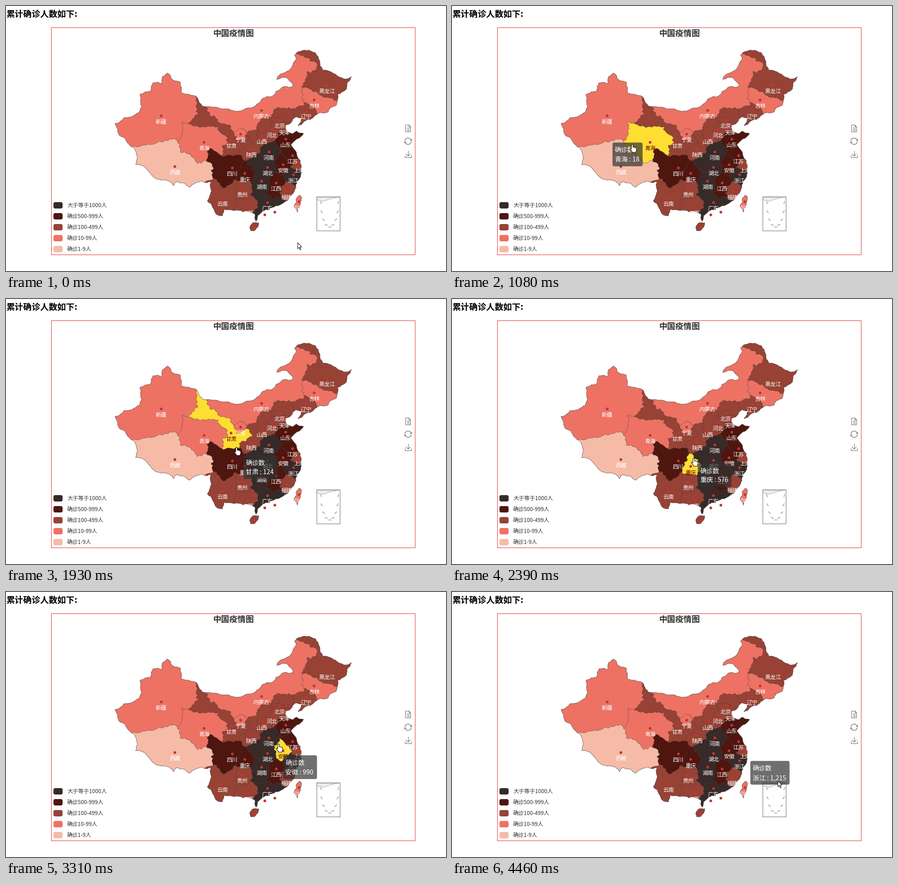
Write a matplotlib script that moves like this. It is 964 by 581 pixels and loops after 4.54 s.

```python
import random

import matplotlib.pyplot as plt
import numpy as np
from matplotlib.animation import FuncAnimation
from matplotlib.colors import to_rgb
from matplotlib.patches import Arc, Circle, FancyBboxPatch, PathPatch, Polygon, Rectangle
from matplotlib.path import Path

W, H, DPI = 964, 581, 64
LOOP, FRAMES = 4540, 59
PT = 72 / DPI
FONT = "Noto Sans CJK JP"
LEVELS = ["#f5bba7", "#ee7263", "#974236", "#4e160f", "#372a28"]
YELLOW, EDGE, RED, GRAY = "#ffdf33", "#444444", "#c23531", "#666666"

fig = plt.figure(figsize=(W / DPI, H / DPI), dpi=DPI, facecolor="white")
ax = fig.add_axes([0, 0, 1, 1])
ax.axis("off")


def text(x, y, s, px, color, ha="left", z=5, **kw):
    """Place text with its middle at height y."""
    return ax.text(x, y + 0.35 * px, s, size=px * PT, color=color, ha=ha,
                   va="baseline", family=FONT, zorder=z, **kw)


def line(*pts, color=GRAY, lw=1.0):
    x, y = zip(*pts)
    ax.plot(x, y, color=color, lw=lw * PT, zorder=4, solid_capstyle="butt")


def rounded(x, y, w, h, color, z=1):
    return ax.add_patch(FancyBboxPatch((x, y), w, h, fc=color, ec="none", zorder=z,
                                       boxstyle="round,pad=0,rounding_size=4"))


# ---- Map: every spot belongs to the area with the nearest site ----
names, counts, labels, sites = [], [], [], []


def mark(name, x, y):
    ax.add_patch(Circle((x, y), 3, fc=RED, ec="none", zorder=3))
    return text(x, y + 13, name, 12, "white", "center")


def area(name, count, *points):
    """The first site carries the dot and the label."""
    sites.extend((len(names), x, y) for x, y in points)
    labels.append(mark(name, *points[0]))
    names.append(name)
    counts.append(count)


area("新疆", 76, (340, 241), (290, 285), (322, 276), (355, 281), (370, 276), (402, 236))
area("西藏", 1, (370, 352), (298, 328), (334, 326), (360, 306), (393, 344), (438, 360))
area("青海", 18, (434, 299), (397, 298), (402, 277), (419, 274), (447, 276), (465, 288),
     (475, 294), (462, 312), (430, 322), (415, 310))
area("甘肃", 124, (493, 294), (421, 254), (434, 235), (447, 252), (481, 272), (488, 312),
     (526, 295))
area("内蒙古", 75, (560, 229), (452, 228), (470, 236), (485, 247), (505, 262), (532, 262),
     (545, 240), (575, 222), (605, 208), (636, 210), (636, 196), (645, 150), (655, 122),
     (672, 130))
area("黑龙江", 480, (703, 174), (672, 171), (700, 185), (722, 192), (672, 160), (684, 146),
     (690, 128), (676, 112), (662, 104))
area("吉林", 91, (675, 206), (662, 195), (690, 212), (712, 216))
area("辽宁", 121, (658, 230), (643, 232))
area("北京", 399, (600, 250))
area("天津", 135, (610, 264))
area("河北", 311, (583, 271), (600, 238), (615, 243))
area("山西", 132, (561, 285), (568, 262))
area("陕西", 245, (537, 314), (540, 285))
area("宁夏", 71, (514, 281))
area("山东", 755, (613, 292))
area("河南", 1271, (576, 320))
area("江苏", 631, (628, 328))
area("安徽", 990, (607, 348))
area("上海", 335, (642, 348))
area("浙江", 1215, (630, 370))
area("福建", 293, (615, 406))
area("江西", 935, (592, 388), (588, 408))
area("湖北", 68128, (573, 354), (553, 342))
area("湖南", 1018, (560, 384), (560, 402))
area("四川", 538, (496, 355), (454, 325), (466, 360), (491, 343), (480, 385))
area("重庆", 576, (523, 367))
area("贵州", 146, (517, 401))
area("云南", 174, (474, 421), (460, 400), (492, 402))
area("广西", 252, (531, 442))
area("广东", 1349, (573, 431), (592, 432), (550, 462))
area("海南", 168, (544, 487))
area("台湾", 30, (642, 429))
mark("香港", 589, 452)
mark("澳门", 567, 458)

FRONTIER = [(441, 427), (450, 406), (449, 386), (430, 384), (403, 397), (391, 389),
            (374, 385), (367, 394), (358, 384), (325, 376), (284, 348), (287, 329),
            (281, 312), (270, 304), (247, 282), (239, 257), (258, 245), (292, 233),
            (297, 222), (294, 193), (317, 187), (322, 168), (341, 170), (343, 155),
            (354, 147), (363, 160), (382, 167), (385, 191), (420, 202), (430, 219),
            (465, 223), (503, 231), (541, 222), (562, 203), (580, 199), (592, 187),
            (629, 175), (614, 157), (593, 161), (600, 150), (624, 137), (636, 114),
            (632, 108), (649, 98), (677, 102), (688, 122), (694, 141), (721, 149),
            (740, 160), (757, 155), (746, 182), (727, 193), (724, 217)]
COAST = [(710, 223), (706, 232), (688, 234), (667, 249), (640, 263), (648, 245),
         (637, 243), (628, 249), (623, 257), (610, 262), (613, 270), (629, 280),
         (636, 274), (652, 279), (624, 304), (645, 339), (647, 361), (635, 392),
         (626, 413), (606, 433), (577, 446), (551, 460), (548, 472), (545, 456),
         (520, 452), (478, 446), (474, 460), (463, 458)]
TAIWAN = [(642, 415), (647, 418), (645, 430), (638, 452), (631, 440), (636, 422)]
HAINAN = [(534, 486), (540, 476), (554, 475), (552, 484), (545, 492), (536, 493)]


def rough(pts, rng, depth=3):
    """Break straight sides into a natural looking border."""
    if depth == 0:
        return pts
    out = []
    for a, b in zip(pts, pts[1:] + pts[:1]):
        dx, dy = b[0] - a[0], b[1] - a[1]
        k = rng.uniform(-0.13, 0.13)
        out += [a, ((a[0] + b[0]) / 2 - dy * k, (a[1] + b[1]) / 2 + dx * k)]
    return rough(out, rng, depth - 1)


rng = random.Random(5)
WAVES = [(rng.uniform(0.2, 0.8), rng.uniform(0, 6.3), rng.uniform(0, 6.3)) for _ in range(8)]


def owner(x, y):
    """Index of the nearest area, with waves that make borders uneven."""
    wx, wy = x, y
    for k, turn, phase in WAVES:
        s = 0.7 * np.sin(k * (x * np.cos(turn) + y * np.sin(turn)) + phase)
        wx, wy = wx - s * np.sin(turn), wy + s * np.cos(turn)
    best, who = np.inf, 0
    for i, sx, sy in sites:
        d = (wx - sx) ** 2 + (wy - sy) ** 2
        who = np.where(d < best, i, who)
        best = np.minimum(best, d)
    return who


shores = [Path(rough(p, rng) + [p[0]], closed=True)
          for p in (FRONTIER + COAST, TAIWAN, HAINAN)]
outline = ax.add_patch(PathPatch(Path.make_compound_path(*shores), fc="none", ec=EDGE,
                                 lw=0.7 * PT, joinstyle="round", zorder=2))

X0, X1, Y0, Y1 = 234, 762, 92, 500
cells = owner(*np.meshgrid(np.arange(X0, X1, 0.5) + 0.25, np.arange(Y0, Y1, 0.5) + 0.25))
border = (cells != np.roll(cells, 1, 0)) | (cells != np.roll(cells, 1, 1))
cells[border] = len(names)
palette = [LEVELS[np.digitize(c, [10, 100, 500, 1000])] for c in counts] + [EDGE]
palette = np.array([to_rgb(c) for c in palette])
land = ax.imshow(palette[cells], extent=(X0, X1, Y1, Y0), aspect="auto", zorder=1)
land.set_clip_path(outline)
ax.set_xlim(0, W)
ax.set_ylim(H, 0)

# ---- Page furniture ----
text(0, 17, "累计确诊人数如下:", 18.72, "black", weight="bold")
text(498, 60, "中国疫情图", 18, "#333333", "center", weight="bold")
ax.add_patch(Rectangle((98.5, 46.5), 797, 498, fc="none", ec="#e03030", lw=PT))
KEYS = ["确诊1-9人", "确诊10-99人", "确诊100-499人", "确诊500-999人", "大于等于1000人"]
for i, (color, key) in enumerate(zip(LEVELS, KEYS)):
    y = 533 - 24 * i
    rounded(104, y - 7, 20, 14, color)
    text(134, y - 0.5, key, 12, "#333333")

# Inset of the southern sea
ax.add_patch(Polygon([(681, 418), (732, 418), (706, 424), (696, 428), (681, 425)],
                     fc="#eeeeee", ec="#999999", lw=0.8 * PT))
ax.add_patch(Rectangle((680.5, 418.5), 51, 74, fc="none", ec="#999999", lw=1.5 * PT))
for t in np.linspace(0, np.pi, 9):
    x, y = 709 + 19 * np.cos(t), 431 + 53 * np.sin(t)
    dx, dy = -2.2 * np.sin(t) - 1, 3 * np.cos(t)
    line((x - dx, y - dy), (x + dx, y + dy), color="#888888", lw=1.3)

# Toolbox icons
line((883, 261), (875.5, 261), (875.5, 276), (886.5, 276), (886.5, 265),
     (883, 261), (883, 265), (886.5, 265))
for y in (267, 270, 273):
    line((878, y), (884, y))
for side, start in ((1, 185), (-1, 5)):
    ax.add_patch(Arc((881, 296.5), 14, 14, theta1=start, theta2=start + 160,
                     ec=GRAY, lw=1.2 * PT))
    line((881 + 4 * side, 296.5 - 2 * side), (881 + 7.5 * side, 296.5 - side),
         (881 + 8 * side, 296.5 - 4.5 * side))
line((881, 317), (881, 329))
line((876, 324), (881, 329), (886, 324))
line((874, 327), (874, 332), (888, 332), (888, 327))

# ---- Pointer and tooltip ----
box = rounded(0, 0, 66, 52, (0.196, 0.196, 0.196, 0.7), 10)
head = text(0, 0, "确诊数", 14, "white", z=11)
body = text(0, 0, "", 14, "white", z=11)
HAND = np.array([(-1.7, 1.2), (0, 0), (1.7, 1.2), (1.7, 6.5), (4.6, 6.8), (7, 7.7),
                 (9, 8.5), (9.3, 13), (7.5, 18), (0, 18), (-1.2, 15), (-5, 11),
                 (-4.5, 9), (-3, 9.3), (-1.7, 11)])
ARROW = np.array([(0, 0), (0, 13), (3, 10.2), (5.2, 15.5), (7.2, 14.6), (5, 9.6), (9, 9.2)])
pointer = ax.add_patch(Polygon(ARROW, fc="white", ec="black", lw=PT, zorder=12))

# Stops of the pointer: frame, x, y
STOPS = np.array([(0, 639, 519), (1, 632, 508), (2, 587, 440), (5, 560, 420),
                  (7, 332, 280), (13, 332, 280), (14, 395, 303), (18, 448, 335),
                  (21, 486, 312), (23, 505, 325), (25, 505, 325), (28, 512, 337),
                  (35, 553, 364), (38, 553, 364), (42, 597, 333), (43, 597, 333),
                  (47, 622, 328), (52, 628, 336), (55, 628, 336), (56, 640, 364),
                  (57, 714, 414)])
LAG, OFFSET = 0.55, 19


def plan():
    """Pointer, area below it, tooltip place and tooltip area for each frame."""
    poses, tip, goal, topic = [], None, None, None
    for n in range(FRAMES):
        at = np.array([np.interp(n, STOPS[:, 0], STOPS[:, k]) for k in (1, 2)])
        inside = any(s.contains_point(at) for s in shores)
        hover = int(owner(*at)) if inside else None
        if inside:
            topic = hover
            tip = at + OFFSET if tip is None else tip
        if goal is not None:
            tip = tip + LAG * (goal - tip)
        if inside:
            goal = at + OFFSET
        poses.append((at, hover, tip, topic))
    return poses


poses = plan()


def update(n):
    at, hover, tip, topic = poses[n]
    colors = palette.copy()
    if hover is not None:
        colors[hover] = to_rgb(YELLOW)
    land.set_data(colors[cells])
    for i, label in enumerate(labels):
        label.set_color("#640000" if i == hover else "white")

    for part in (box, head, body):
        part.set_visible(topic is not None)
    if topic is not None:
        x, y = tip
        count = f"{counts[topic]:,}"
        commas = count.count(",")
        box.set_bounds(x, y, 50 + 14 * (len(names[topic]) - 2)
                       + 8 * (len(count) - commas) + 4 * commas, 52)
        head.set_position((x + 5, y + 20.5))
        body.set_position((x + 5, y + 41.5))
        body.set_text(f"{names[topic]} : {count}")

    pointer.set_xy((ARROW if hover is None else HAND) + at)
    return []


anim = FuncAnimation(fig, update, frames=FRAMES, interval=LOOP / FRAMES,
                     init_func=lambda: update(0), repeat=True, repeat_delay=0)
plt.show()
```
